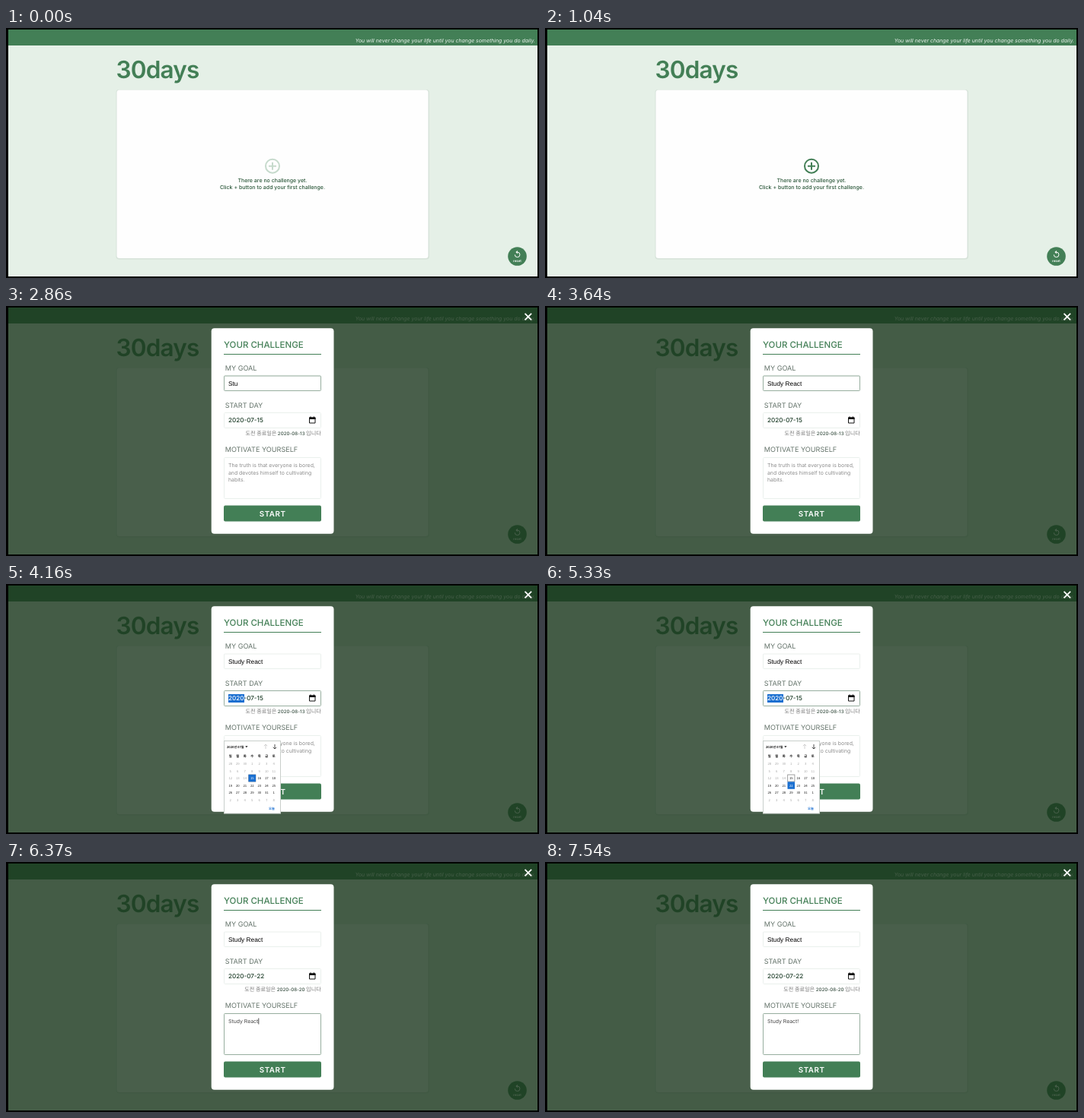
An HTML page for the animation above (8000 ms loop, 700 by 329 pixels).

```html
<!DOCTYPE html>
<html lang="en">
<head>
<meta charset="utf-8">
<title>30days</title>
<style>
html, body { margin: 0; width: 100%; height: 100%; overflow: hidden; background: #000; }
svg { display: block; width: 700px; height: 329px; text-rendering: geometricPrecision; }
text { font-family: Inter, sans-serif; }
.mid { text-anchor: middle; }
.note { font-size: 7px; font-weight: 500; fill: #285537; }
.label { font-size: 9.1px; fill: #64736a; }
.goal { font: 8.3px "Liberation Sans", Arial, sans-serif; fill: #000; }
.date { font-size: 8.1px; font-weight: 500; fill: #1d3d28; }
.ends { font: 7.1px "Noto Sans CJK KR", "Noto Sans CJK", sans-serif; fill: #777; text-anchor: end; }
.ends tspan { font: 500 6.2px Inter, sans-serif; fill: #3c5245; }
.area { font-size: 6.9px; fill: #444; }
.hint { fill: #8c8c8c; }
.goal.hint { fill: #757575; }
.field { fill: #fff; stroke: #eaf0ec; }
.focus { fill: none; stroke: #97ae9f; }
.cal text { font: 4.3px "Noto Sans CJK KR", "Noto Sans CJK", sans-serif; fill: #222; text-anchor: middle; }
.cal .off { fill: #aaa; }
.cal .head { font-weight: 700; fill: #111; }
.cal .month { font-size: 4px; text-anchor: start; }
.cal .on { fill: #fff; }

/* One 8 s loop of hard cuts */
.step { opacity: 0; animation: 8s step-end infinite; }
.plus { stroke: #c6dacc; animation: hover 8s step-end infinite; }
.modal { animation-name: modal; }
.goal-hint { animation-name: goal-hint; }
.goal-1 { animation-name: goal-1; }
.goal-2 { animation-name: goal-2; }
.goal-3 { animation-name: goal-3; }
.goal-focus { animation-name: goal-focus; }
.day-old { animation-name: day-old; }
.day-new { animation-name: day-new; }
.day-focus { animation-name: day-focus; }
.year { animation-name: year; }
.popup { animation-name: popup; }
.pick-old { animation-name: pick-old; }
.pick-hover { animation-name: pick-hover; }
.pick-new { animation-name: pick-new; }
.area-focus { animation-name: area-focus; }
.area-hint { animation-name: area-hint; }
.area-1 { animation-name: area-1; }
.area-2 { animation-name: area-2; }
.caret-1 { animation-name: caret-1; }
.caret-2 { animation-name: caret-2; }

@keyframes hover {
  0% { stroke: #c6dacc; }
  9.75% { stroke: #9abca5; }
  11.375% { stroke: #6f9e7e; }
  13%, 100% { stroke: #437f56; }
}
@keyframes modal { 0% { opacity: 0; } 19.5%, 100% { opacity: 1; } }
@keyframes goal-hint { 0% { opacity: 1; } 35.75%, 100% { opacity: 0; } }
@keyframes goal-1 { 0%, 37.375%, 100% { opacity: 0; } 35.75% { opacity: 1; } }
@keyframes goal-2 { 0%, 45.5%, 100% { opacity: 0; } 37.375% { opacity: 1; } }
@keyframes goal-3 { 0% { opacity: 0; } 45.5%, 100% { opacity: 1; } }
@keyframes goal-focus { 0%, 48.75%, 100% { opacity: 0; } 29.25% { opacity: 1; } }
@keyframes day-old { 0% { opacity: 1; } 68.25%, 100% { opacity: 0; } }
@keyframes day-new { 0% { opacity: 0; } 68.25%, 100% { opacity: 1; } }
@keyframes day-focus { 0%, 73.125%, 100% { opacity: 0; } 48.75% { opacity: 1; } }
@keyframes year { 0%, 68.25%, 100% { opacity: 0; } 48.75% { opacity: 1; } }
@keyframes popup { 0%, 68.25%, 100% { opacity: 0; } 52% { opacity: 1; } }
@keyframes pick-old { 0% { opacity: 1; } 66.625%, 100% { opacity: 0; } }
@keyframes pick-hover { 0%, 66.625%, 100% { opacity: 0; } 60.125% { opacity: 1; } }
@keyframes pick-new { 0% { opacity: 0; } 66.625%, 100% { opacity: 1; } }
@keyframes area-focus { 0% { opacity: 0; } 73.125%, 100% { opacity: 1; } }
@keyframes area-hint { 0% { opacity: 1; } 79.625%, 100% { opacity: 0; } }
@keyframes area-1 { 0%, 87.75%, 100% { opacity: 0; } 79.625% { opacity: 1; } }
@keyframes area-2 { 0% { opacity: 0; } 87.75%, 100% { opacity: 1; } }
@keyframes caret-1 { 0%, 86.125%, 100% { opacity: 0; } 79.625% { opacity: 1; } }
@keyframes caret-2 { 0%, 94.25%, 100% { opacity: 0; } 87.75% { opacity: 1; } }
</style>
</head>
<body>
<svg viewBox="0 0 700 329">
  <rect width="700" height="329"/>
  <rect x="3" y="2" width="695" height="325" fill="#e5f0e7"/>
  <rect x="3" y="2" width="695" height="21" fill="#437f56"/>
  <text x="695" y="18.5" text-anchor="end" font-size="6.93" font-style="italic" fill="#eef5f0">You will never change your life until you change something you do daily.</text>
  <text x="144.5" y="66" font-size="31.5" font-weight="600" letter-spacing="-.8" fill="#437f56">30days</text>

  <rect x="144.5" y="81" width="411.5" height="223.5" rx="4" fill="#d7e3da"/>
  <rect x="145.5" y="81.5" width="409" height="221.5" rx="3.5" fill="#fefefe"/>
  <g class="plus" fill="none" stroke-width="2">
    <circle cx="350" cy="181.7" r="9"/>
    <path d="M345 181.7h10M350 176.7v10"/>
  </g>
  <text class="note mid" x="350" y="203">There are no challenge yet.</text>
  <text class="note mid" x="350" y="212.3">Click + button to add your first challenge.</text>

  <circle cx="671.5" cy="300.5" r="12.3" fill="#437f56"/>
  <path d="M668.3 298.3a3.3 3.3 0 1 0 3.3-3.3" fill="none" stroke="#fff"/>
  <path d="M671.8 292.8v4.4l-2.4-2.2z" fill="#fff"/>
  <text class="mid" x="671.5" y="307.5" font-size="4.4" font-weight="600" fill="#fff">reset</text>

  <g class="step modal">
    <rect x="3" y="2" width="695" height="325" fill="#18331a" fill-opacity=".784"/>
    <path d="M681.5 9.8l8.6 8.6M690.1 9.8l-8.6 8.6" stroke="#fff" stroke-width="1.8"/>
    <rect x="269.7" y="29.3" width="160.8" height="270.4" rx="4" fill="#fff"/>
    <text x="286" y="55.3" font-size="11.5" font-weight="500" fill="#437f56">YOUR CHALLENGE</text>
    <path d="M286 63.5h128" stroke="#437f56"/>

    <text class="label" x="287.7" y="85.3">MY GOAL</text>
    <rect class="field" x="286.5" y="92" width="127" height="19.5" rx="1"/>
    <rect class="focus step goal-focus" x="286.5" y="92" width="127" height="19.5" rx="1"/>
    <text class="goal hint step goal-hint" x="292" y="104.7">Study React</text>
    <text class="goal step goal-1" x="292" y="104.7">Stu</text>
    <text class="goal step goal-2" x="292" y="104.7">Study</text>
    <text class="goal step goal-3" x="292" y="104.7">Study React</text>

    <text class="label" x="287.7" y="133.6">START DAY</text>
    <rect class="field" x="286.5" y="140.5" width="127" height="20" rx="1"/>
    <rect class="focus step day-focus" x="286.5" y="140.5" width="127" height="20" rx="1"/>
    <text class="date step day-old" x="292" y="153.4">2020-07-15</text>
    <text class="date step day-new" x="292" y="153.4">2020-07-22</text>
    <g class="step year">
      <rect x="292" y="145" width="21" height="11" fill="#1a6fd0"/>
      <text class="date" x="292" y="153.4" style="fill:#fff">2020</text>
    </g>
    <path d="M398.5 147h7.5v7h-7.5z" fill="none" stroke="#111"/>
    <path d="M398 146.5h8.5v2.6h-8.5zM399.4 145.4h1.2v2h-1.2zM403.8 145.4h1.2v2h-1.2z" fill="#111"/>
    <text class="ends step day-old" x="413.7" y="169.7">도전 종료일은 <tspan>2020-08-13</tspan> 입니다</text>
    <text class="ends step day-new" x="413.7" y="169.7">도전 종료일은 <tspan>2020-08-20</tspan> 입니다</text>

    <text class="label" x="287.7" y="192">MOTIVATE YOURSELF</text>
    <rect class="field" x="286.5" y="199.5" width="127" height="54" rx="1"/>
    <rect class="focus step area-focus" x="286.5" y="199.5" width="127" height="54" rx="1"/>
    <g class="step area-hint">
      <text class="area hint" x="292" y="211.7">The truth is that everyone is bored,</text>
      <text class="area hint" x="292" y="221.5">and devotes himself to cultivating</text>
      <text class="area hint" x="292" y="231.3">habits.</text>
    </g>
    <text class="area step area-1" x="292" y="211.7">Study React</text>
    <text class="area step area-2" x="292" y="211.7">Study React!</text>
    <path class="step caret-1" d="M331.8 205.5v8" stroke="#222" stroke-width=".8"/>
    <path class="step caret-2" d="M334 205.5v8" stroke="#222" stroke-width=".8"/>

    <rect x="286" y="262.5" width="128" height="21" rx="2" fill="#437f56"/>
    <text class="mid" x="350.2" y="276.5" font-size="9.8" font-weight="600" letter-spacing=".6" fill="#fff">START</text>

    <g class="step popup cal">
      <rect x="286.5" y="206.5" width="74" height="95.5" fill="#fff" stroke="#c9cfcb"/>
      <text class="head month" x="290" y="215.7">2020년 07월</text>
      <path d="M314.3 213.2h3.2l-1.6 2z" fill="#111"/>
      <path d="M341 217v-6m-2.2 2.2l2.2-2.2l2.2 2.2" fill="none" stroke="#c4c4c4" stroke-width=".8"/>
      <path d="M353 211v6m-2.2-2.2l2.2 2.2l2.2-2.2" fill="none" stroke="#222" stroke-width=".8"/>
      <rect class="step pick-hover" x="318.5" y="260.5" width="9.5" height="9.2" fill="#e4e4e4"/>
      <g id="days"></g>
      <rect x="318.7" y="251" width="9.2" height="9" fill="none" stroke="#888" stroke-width=".8"/>
      <g class="step pick-old">
        <rect x="318.5" y="250.8" width="9.5" height="9.4" fill="#1a6fd0"/>
        <text class="on" x="323.3" y="257.2">15</text>
      </g>
      <g class="step pick-new">
        <rect x="318.5" y="260.3" width="9.5" height="9.5" fill="#1a6fd0"/>
        <text class="on" x="323.3" y="266.7">22</text>
      </g>
      <text x="349" y="297.2" style="fill:#1a6fd0;font-weight:700">오늘</text>
    </g>
  </g>
</svg>
<script>
const days = document.getElementById("days");

function cell(label, col, y, cls) {
  const t = document.createElementNS("http://www.w3.org/2000/svg", "text");
  t.setAttribute("x", 294.8 + col * 9.5);
  t.setAttribute("y", y);
  t.setAttribute("class", cls);
  t.textContent = label;
  days.append(t);
}

[..."일월화수목금토"].forEach((name, col) => cell(name, col, 228.3, "head"));

// July 2020 starts on a Wednesday; days before the 15th are disabled.
for (let i = 0; i < 42; i++) {
  const day = i - 2;
  const label = day < 1 ? day + 30 : day > 31 ? day - 31 : day;
  const off = day < 15 || i > 34;
  cell(label, i % 7, 238.2 + Math.floor(i / 7) * 9.5, off ? "off" : "");
}
</script>
</body>
</html>
```
